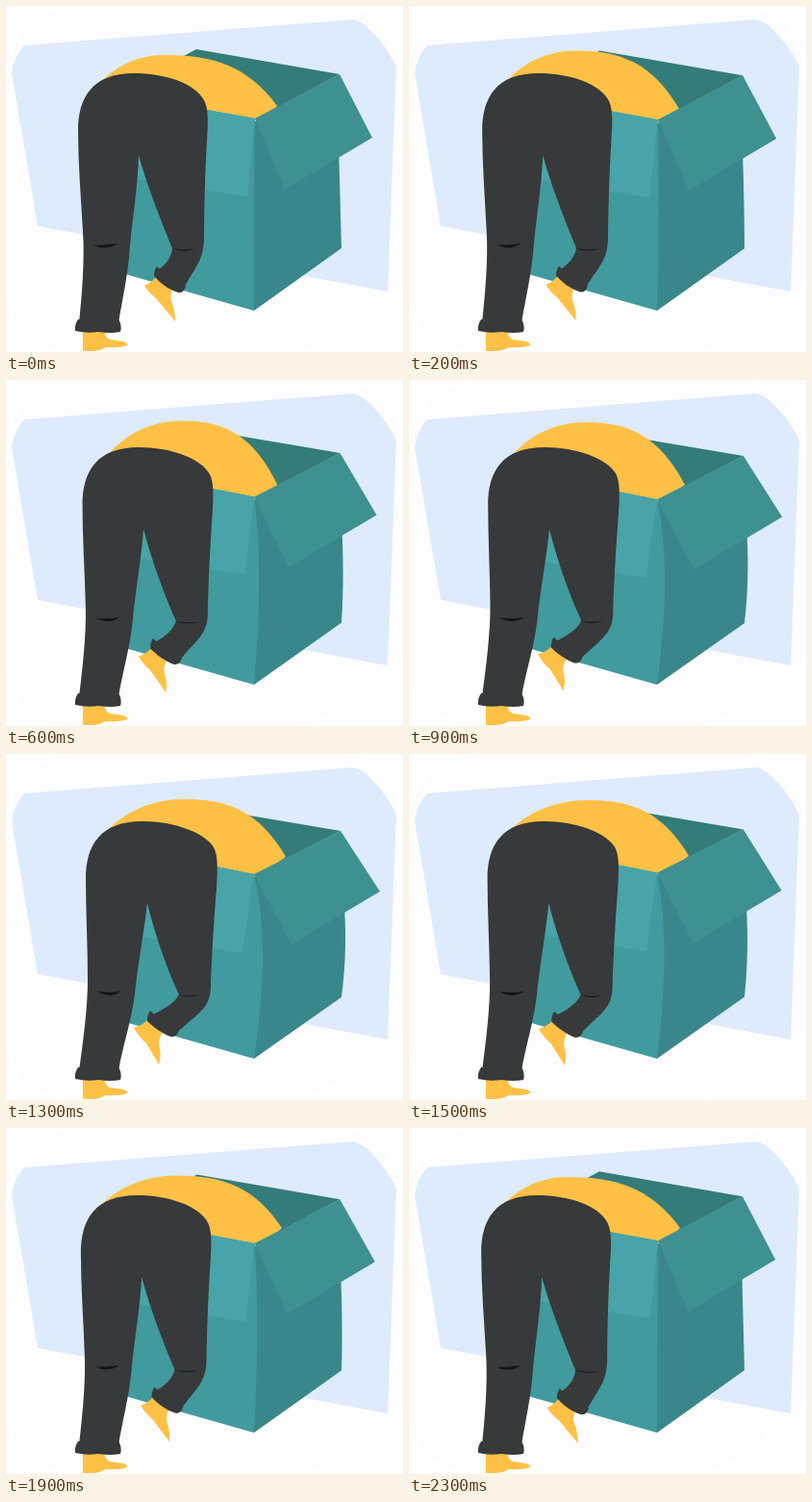
These frames come from a looping animation (413x360 px, 2.4 s). An HTML page:

```html
<!DOCTYPE html>
<html lang="en">
<head>
<meta charset="utf-8">
<title>Searching in a box</title>
<style>
  html, body { margin: 0; width: 100%; height: 100%; overflow: hidden; background: #fff; }
  svg { display: block; width: 413px; height: 360px; }
</style>
</head>
<body>
<svg viewBox="0 0 413 360">
  <path fill="#fdfdfd" d="M0 62C8 30 36 4 72 0H352C388 8 408 34 413 70V288C400 298 384 306 370 320C348 342 325 354 300 360H66C34 354 8 336 0 306Z"/>
  <path fill="#deebfc" d="M19 41L361 14Q369 15 380 26Q396 42 406 63L397 297L33 229L6 70Q8 53 19 41Z"/>
  <path id="inside" fill="#347c79"/>
  <path id="shirt" fill="#fec145"/>
  <path id="side" fill="#39878a"/>
  <path id="front" fill="#419a9e"/>
  <path id="rightFlap" fill="#3e9091"/>
  <path id="leftFlap" fill="#48a4a8"/>
  <path id="backFoot" fill="#fec145"/>
  <path fill="#fec145" d="M80 337H102Q103 345 108 347L122 349Q127 351 126 353Q118 356 104 355Q97 359 90 359H80Z"/>
  <path id="pants" fill="#37393a"/>
  <path fill="#37393a" d="M75 326H117Q121 332 119 339Q109 341 96 339Q84 341 72 338Q71 332 75 326Z"/>
  <path id="backCuff" fill="#37393a"/>
  <path id="leftCrease" fill="#131415"/>
  <path id="rightCrease" fill="#131415"/>
</svg>
<script>
const LOOP = 2400, STEP = 100;

// Each part at rest and at the far end of the sway.
const parts = {
  inside: [
    'M198 45L347 71L259 118L110 92Z',
    'M200 55L348 80L258 126L110 99Z'],
  side: [
    'M255 119L346 140C347 180 348 215 349 252L258 317L255 250Z',
    'M255 127L351 146C354 180 354 215 349 253L258 317L255 250Z'],
  front: [
    'M110 90L259 117C258 180 258 250 258 317L110 275Z',
    'M110 95L258 125C272 185 268 250 258 317L110 275Z'],
  leftFlap: [
    'M125 93L259 117L251 198L130 179Z',
    'M125 98L258 125L246 207L134 189Z'],
  rightFlap: [
    'M347 71L381 137L290 191L259 117Z',
    'M348 80L389 143L297 198L258 125Z'],
  backFoot: [
    'M157 280Q153 287 144 291Q149 299 156 304L176 328Q176 317 172 307Q170 301 174 292Z',
    'M149 275Q143 282 133 285Q139 295 146 301L159 323Q162 312 159 303Q158 296 164 288Z'],
  pants: [
    'M76 330C79 300 82 265 80 235C78 200 75 165 75 130C75 95 90 70 133 70C165 70 198 80 207 100C211 110 210 125 209 140C207 175 206 215 206 243C205 262 200 268 188 288L182 297L156 276C166 270 172 262 173 252C162 225 146 185 138 155C137 190 131 225 129 250C127 280 121 305 117 330Z',
    'M76 330C80 300 85 265 85 235C85 200 83 165 83 130C83 95 98 70 142 70C175 70 207 82 216 97C221 106 220 122 219 140C216 175 214 215 213 240C213 262 205 266 181 287L173 292L151 272C165 265 175 260 180 250C168 225 154 185 147 155C143 190 136 225 134 250C130 280 121 305 117 330Z'],
  backCuff: [
    'M157 271C166 280 175 288 187 291C186 296 183 299 179 298C169 295 160 288 154 281Q154 275 157 271Z',
    'M150 267C159 276 168 284 180 287C179 292 175 295 171 294C163 291 153 284 147 278Q147 271 150 267Z'],
  leftCrease: [
    'M91 249Q104 249 116 247Q105 255 91 249Z',
    'M95 247Q108 249 120 247Q108 255 95 247Z'],
  rightCrease: [
    'M172 252Q185 255 197 253Q185 257 172 252Z',
    'M178 250Q191 253 203 250Q191 255 178 250Z']
};

// time, sway, shirt left x y, shirt top x y, shirt right x y
const keys = [
  [0,    0,    91, 88, 165, 51, 282, 104],
  [400,  0.33, 103, 79, 182, 43, 281, 110],
  [900,  0.9,  107, 79, 184, 44, 287, 109],
  [1300, 1,    102, 83, 186, 47, 291, 107],
  [1700, 0.58, 101, 82, 186, 49, 290, 105],
  [1900, 0.36, 98, 81, 178, 49.5, 287, 104],
  [2300, 0.02, 91, 88, 165, 51, 282, 104]
];

const el = id => document.getElementById(id);

function keyAt(i) {
  const n = keys.length, turn = Math.floor(i / n);
  const [time, ...values] = keys[i - turn * n];
  return { time: time + turn * LOOP, values };
}

// Smooth looping curve through the keys.
function pose(t) {
  let i = keys.length - 1;
  while (keys[i][0] > t) i--;
  const [a, b, c, d] = [-1, 0, 1, 2].map(k => keyAt(i + k));
  const span = c.time - b.time, u = (t - b.time) / span;
  return b.values.map((from, k) => {
    const to = c.values[k];
    const m0 = (to - a.values[k]) / (c.time - a.time) * span;
    const m1 = (d.values[k] - from) / (d.time - b.time) * span;
    const u2 = u * u, u3 = u2 * u;
    return from * (2 * u3 - 3 * u2 + 1) + m0 * (u3 - 2 * u2 + u)
      + to * (3 * u2 - 2 * u3) + m1 * (u3 - u2);
  });
}

function mix([from, to], p) {
  const ends = to.match(/\d+/g);
  let i = 0;
  return from.replace(/\d+/g, n => (+n + (ends[i++] - n) * p).toFixed(2) + ' ');
}

function shirtPath(lx, ly, tx, ty, rx, ry) {
  const w = tx - lx, h = ly - ty, dx = rx - tx, dy = ry - ty;
  return `M${lx} ${ly}C${lx + w * 0.25} ${ly - h * 0.65} ${lx + w * 0.6} ${ty} ${tx} ${ty}`
    + `C${tx + dx * 0.44} ${ty} ${rx - dx * 0.26} ${ry - dy * 0.78} ${rx} ${ry}L259 130L120 120Z`;
}

function draw(t) {
  const [sway, ...shirt] = pose(t);
  for (const id in parts) el(id).setAttribute('d', mix(parts[id], sway));
  el('shirt').setAttribute('d', shirtPath(...shirt));
}

const start = performance.now();
function tick() {
  const t = (performance.now() - start) % LOOP;
  draw(Math.floor(t / STEP) * STEP);
  requestAnimationFrame(tick);
}
tick();
</script>
</body>
</html>
```
